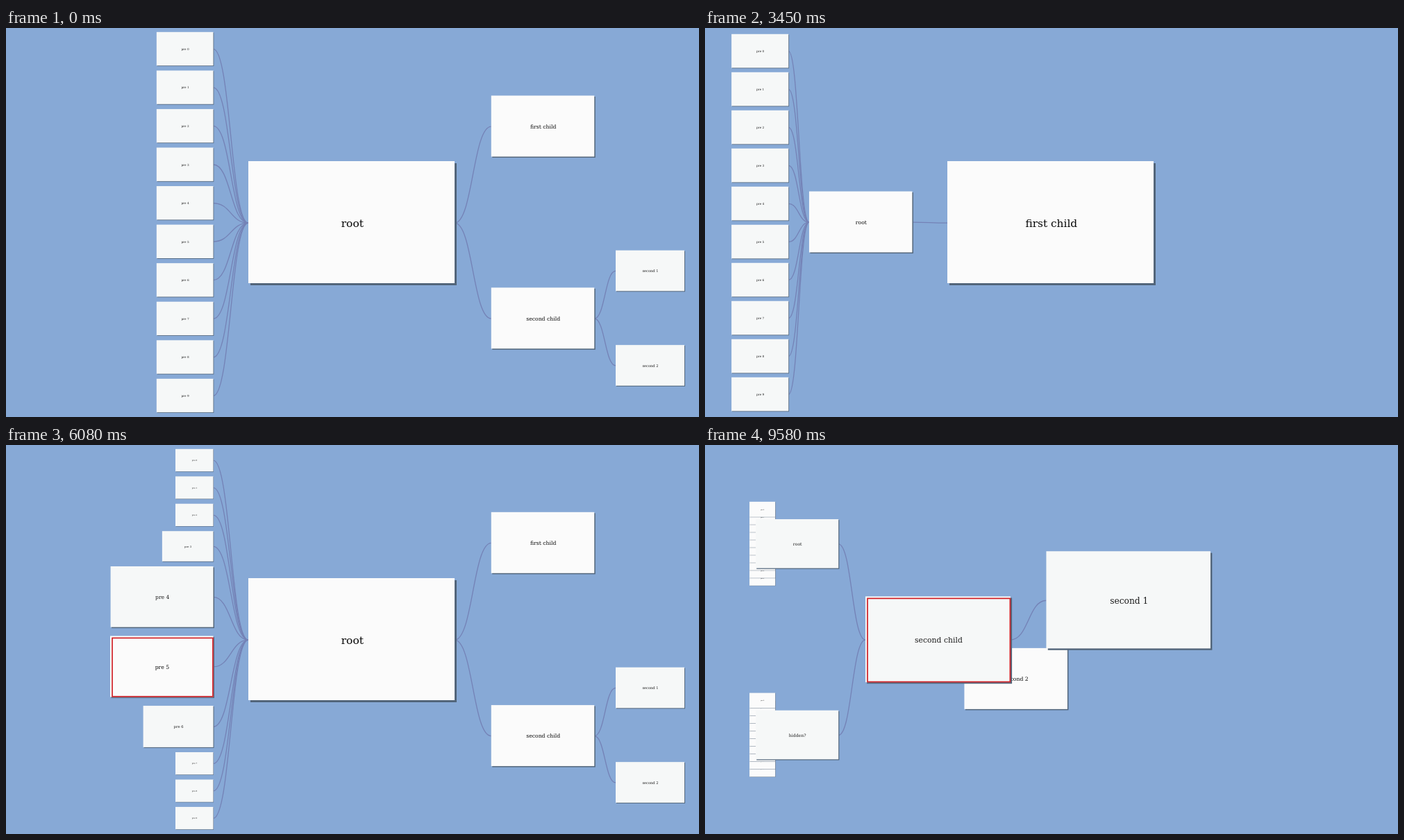
An HTML page for the animation above (9610 ms loop, 998 px wide and 561 px high).

```html
<!DOCTYPE html>
<html lang="en">
<head>
<meta charset="utf-8">
<title>Tree navigation</title>
<style>
html, body { margin: 0; width: 100%; height: 100%; overflow: hidden; background: #87a9d6; }
svg { display: block; width: 100%; height: 100%; }
.link { fill: none; stroke: #7482b6; stroke-width: 1.3; }
.shadow { fill: #52657a; }
.hover { fill: none; stroke: #d02228; stroke-width: 1.7; }
text { font: 15.4px "DejaVu Serif", serif; text-anchor: middle; }
</style>
</head>
<body>
<svg id="stage" viewBox="0 0 998 561"></svg>
<script>
const LOOP = 9610, W = 297, H = 176, THIRD = 1 / 3;
const COL = { farLeft: 69.7, left: 224.2, mid: 497.5, right: 773, farRight: 927.5 };
const TOP = 5.8, ROW = 48.4, GAP = 7.16, MIN_ROW = 32.3;
const svg = document.getElementById('stage');
const ten = [...Array(10).keys()];

function add(parent, tag, attrs = {}) {
  const el = document.createElementNS('http://www.w3.org/2000/svg', tag);
  for (const k in attrs) el.setAttribute(k, attrs[k]);
  parent.appendChild(el);
  return el;
}

// Nodes from front to back: id, label, parent, whether it hangs on the left
const nodes = [
  ['root', 'root'],
  ...ten.map(i => ['pre' + i, 'pre ' + i, 'root', true]),
  ['first', 'first child', 'root'],
  ['second', 'second child', 'root'],
  ['s1', 'second 1', 'second'],
  ['s2', 'second 2', 'second'],
  ['hidden', 'hidden?', 'second', true],
  ...ten.map(i => ['hid' + i, 'pre ' + i, 'hidden', true])
].map(([id, label, parent, left]) => ({ id, label, parent, left }));
const byId = Object.fromEntries(nodes.map(n => [n.id, n]));

const linkLayer = add(svg, 'g'), cardLayer = add(svg, 'g');
for (const n of [...nodes].reverse()) {
  if (n.parent) n.link = add(linkLayer, 'path', { class: 'link' });
  n.g = add(cardLayer, 'g');
  const box = { x: -W / 2, y: -H / 2, width: W, height: H };
  add(n.g, 'rect', { ...box, class: 'shadow', transform: 'translate(3 3)' });
  n.card = add(n.g, 'rect', box);
  n.text = add(n.g, 'text', { x: 1.3, y: 6.7 });
  n.text.textContent = n.label;
}
const hover = add(svg, 'rect', { class: 'hover' });

// Layouts map an id to [centre x, centre y, scale]
function preColumn(focus, amount) {
  const bump = ten.map(i => {
    const d = Math.abs(i - focus) / 2.3;
    return d < 1 ? 1 + Math.cos(Math.PI * d) : 0;
  });
  const sum = bump.reduce((a, b) => a + b, 0) || 1;
  const out = {};
  let y = TOP;
  ten.forEach(i => {
    const lens = MIN_ROW + 10 * (ROW - MIN_ROW) * bump[i] / sum;
    const h = ROW + (lens - ROW) * amount;
    const s = Math.min(.5, h / H);
    out['pre' + i] = [298.5 - s * W / 2, y + h / 2, s];
    y += h + GAP;
  });
  return out;
}

function rootView(focus, amount, shift) {
  return {
    root: [COL.mid, 280, 1],
    first: [COL.right, 140.8 + shift, .5],
    second: [COL.right, 419.1 - shift, .5],
    s1: [COL.farRight, 350, THIRD],
    s2: [COL.farRight, 486.5, THIRD],
    ...preColumn(focus, amount)
  };
}

const firstView = { root: [COL.left, 279.6, .5], first: [COL.mid, 280, 1] };
ten.forEach(i => firstView['pre' + i] = [79.2, 33.1 + 55 * i, .2765]);

const leafView = {
  root: [COL.farLeft, 142.3, THIRD],
  hidden: [COL.farLeft, 418, THIRD],
  second: [COL.left, 280.4, .5],
  s1: [COL.mid, 280, 1]
};

const secondView = {
  root: [COL.left, 142.3, .5],
  hidden: [COL.left, 418, .5],
  second: [COL.mid, 280, 1],
  s1: [COL.right, 140.8, .5],
  s2: [COL.right, 419.1, .5]
};
ten.forEach(i => {
  const dy = (i - 4.5) * 27;
  secondView['pre' + i] = [101.4, 142.3 + dy, .125];
  secondView['hid' + i] = [101.4, 418 + dy, .125];
});

// Newcomers keep their final size and start at their nearest visible ancestor
function blend(from, to, p) {
  if (p >= 1) return to;
  const out = {};
  for (const id in to) {
    let src = id;
    while (!from[src]) src = byId[src].parent;
    const a = from[src], b = to[id];
    const s0 = src === id ? a[2] : b[2];
    out[id] = [a[0] + (b[0] - a[0]) * p, a[1] + (b[1] - a[1]) * p, s0 + (b[2] - s0) * p];
  }
  return out;
}

const stepped = (t, start, step) => Math.floor((t - start) / step) * step;
const progress = (t, start, step, length) => stepped(t, start, step) / length;

// Pointer stops: time, x, y; a fourth value means glide to the next stop
const stops = [
  [0, 670, 40], [780, 500, 300], [1470, 672, 200], [1590, 773, 142],
  [2910, 560, 230], [3450, 325, 250], [3680, 225, 271],
  [4800, 225, 271, 1], [5280, 232, 122, 1], [5750, 225, 277], [5820, 225, 279, 1],
  [6080, 235, 291, 1], [6230, 300, 294, 1], [6390, 380, 296],
  [6850, 670, 340], [6910, 773, 420], [7150, 862, 385], [7330, 927, 350],
  [8650, 600, 250], [8940, 325, 265], [9110, 270, 280]
];
function pointer(t) {
  let i = stops.length - 1;
  while (stops[i][0] > t) i--;
  const [t0, x, y, glide] = stops[i];
  if (!glide) return [x, y];
  const [t1, x1, y1] = stops[i + 1], k = (t - t0) / (t1 - t0);
  return [x + (x1 - x) * k, y + (y1 - y) * k];
}

const lensAt = y => (y - TOP) / 54.85 - .5;

function layout(t, mouse) {
  if (t < 2060) return rootView(0, 0, .7);
  if (t < 4040) return blend(rootView(0, 0, .7), firstView, progress(t, 2060, 53, 318));
  if (t < 4800) {
    return blend(firstView, rootView(lensAt(271), 1, 0), progress(t, 4040, 57, 399));
  }
  if (t < 7870) {
    const fade = Math.max(0, Math.min(1, (t - 6230) / 370));
    return rootView(lensAt(mouse[1]), t < 6610 ? 1 - fade : 0, 0);
  }
  if (t < 9400) return blend(rootView(0, 0, 0), leafView, progress(t, 7870, 52, 257));
  return blend(leafView, secondView, progress(t, 9400, 60, 442));
}

function setAttrs(el, attrs) {
  for (const k in attrs) el.setAttribute(k, attrs[k]);
}

function draw(time) {
  let t = time % LOOP;
  if (t > 4800 && t < 6610) t = 4800 + stepped(t, 4800, 53);
  const mouse = pointer(t), view = layout(t, mouse);
  let hit = null;

  for (const n of nodes) {
    const at = view[n.id];
    n.g.style.display = at ? '' : 'none';
    if (n.link) n.link.style.display = at ? '' : 'none';
    if (!at) continue;
    const [x, y, s] = at;
    const crisp = Number.isInteger(Math.log2(s));
    n.g.setAttribute('transform', `translate(${x} ${y}) scale(${s})`);
    n.card.setAttribute('fill', crisp ? '#fbfbfb' : '#f6f8f8');
    n.text.setAttribute('fill', crisp ? '#080808' : '#1c1c1c');
    if (!hit && Math.abs(mouse[0] - x) < s * W / 2 && Math.abs(mouse[1] - y) < s * H / 2) hit = at;
    if (n.link) {
      const up = view[n.parent];
      const [a, b] = n.left ? [at, up] : [up, at];
      const x0 = a[0] + a[2] * W / 2, x1 = b[0] - b[2] * W / 2, xm = (x0 + x1) / 2;
      const y0 = a[1] + 1.2 * a[2], y1 = b[1] + 1.2 * b[2];
      n.link.setAttribute('d', `M${x0} ${y0}C${xm} ${y0} ${xm} ${y1} ${x1} ${y1}`);
    }
  }

  hover.style.display = hit ? '' : 'none';
  if (hit) {
    const [x, y, s] = hit, w = W * s, h = H * s;
    setAttrs(hover, { x: x - w / 2 + 3, y: y - h / 2 + 3, width: w - 3.6, height: h - 3.6 });
  }
}

const begin = performance.now();
function tick() {
  draw(performance.now() - begin);
  requestAnimationFrame(tick);
}
tick();
</script>
</body>
</html>
```
